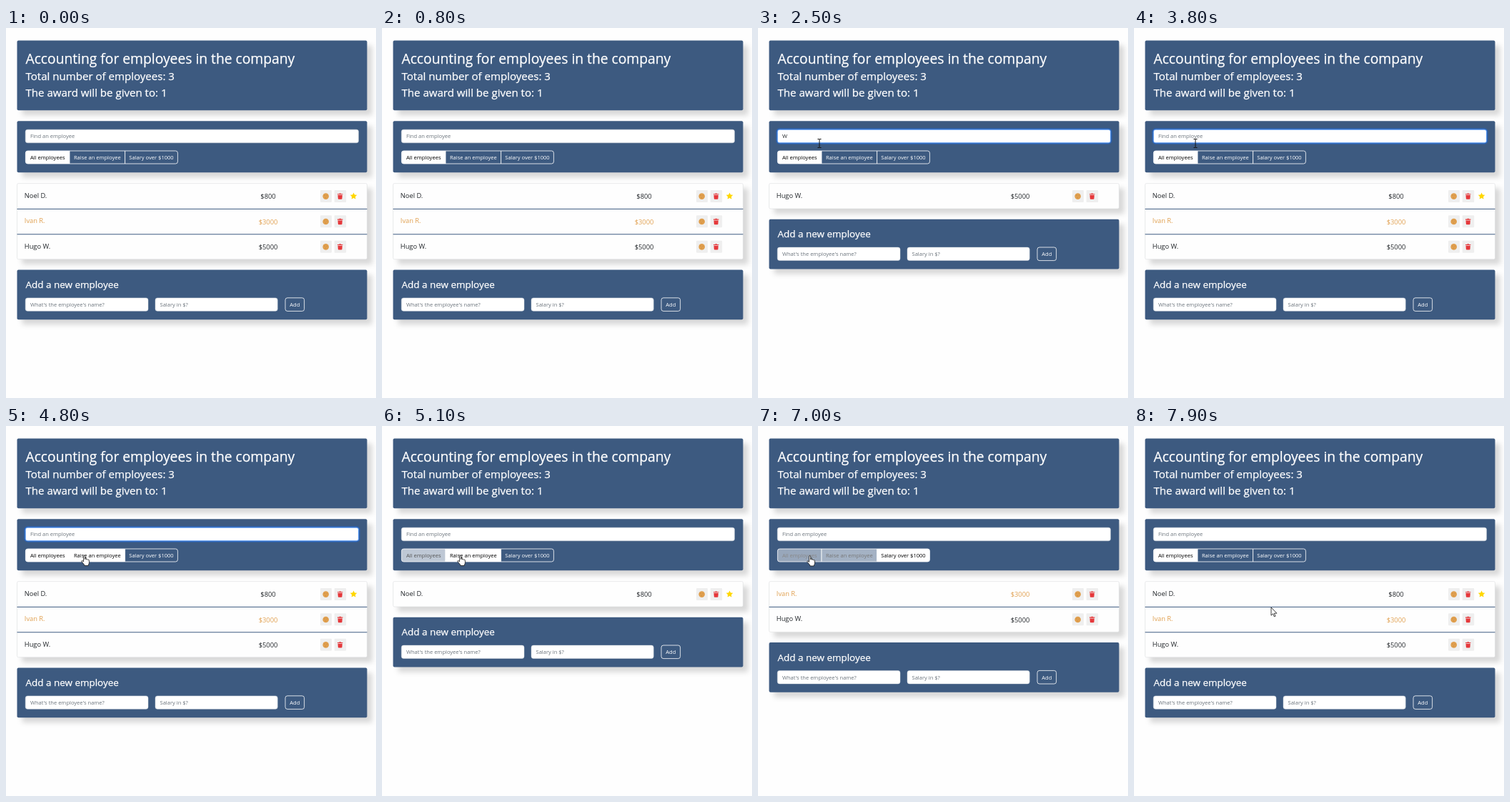
Write an HTML page that moves like this. It is 518 px wide and 518 px high and loops after 8000 ms.

```html
<!DOCTYPE html>
<html lang="en">
<head>
<meta charset="utf-8">
<title>Employee accounting</title>
<style>
  html, body { margin: 0; height: 100%; overflow: hidden; background: #fefefe; }
  svg { display: block; width: 100vw; height: 100vh; }
  text { font-family: "Open Sans", "Noto Sans", sans-serif; fill: #fff; white-space: pre; }
  .panel { fill: #3d5a80; }
  .panel, .list { filter: drop-shadow(7.5px 7.5px 3.8px rgba(0, 0, 0, .15)); }
  .list { fill: #fefefe; stroke: #dcdde0; stroke-width: .6; }
  .h { stroke: #fff; stroke-width: .25; }
  .h1 { font-size: 19.25px; }
  .h2 { font-size: 15.06px; }
  .h3 { font-size: 13.45px; }
  .small { font-size: 7.55px; }
  .mid { text-anchor: middle; }
  .field { fill: #fff; stroke: #ced4da; stroke-width: .5; }
  .hint { fill: #6c757d; }
  .row text { font-size: 9.3px; fill: #212529; }
  .row.bonus text { fill: #e09f4e; }
  .line { stroke: #3d5a80; stroke-width: 1; }
  .tool { fill: #efefef; }
  .focus .field { stroke: #5b9bf8; stroke-width: 1; }
  .ring { fill: none; stroke: rgba(13, 110, 253, .35); stroke-width: 2; visibility: hidden; }
  .focus .ring { visibility: visible; }
  .btn { stroke: #fff; stroke-width: .8; }
</style>
</head>
<body>
<svg viewBox="0 0 518 518">
  <defs>
    <g id="tools">
      <rect class="tool" x="440" y="9.3" width="16" height="17" rx="1"/>
      <rect class="tool" x="459.7" y="9.3" width="16.5" height="17" rx="1"/>
      <circle cx="447.7" cy="18" r="4.3" fill="#e09f4e"/>
      <g fill="#c58a45">
        <circle cx="446" cy="16.8" r=".6"/><circle cx="449.2" cy="17" r=".6"/><circle cx="447.4" cy="19.8" r=".6"/>
      </g>
      <path fill="#e5383b" d="M464 14.6h2.2l.6-.8h1.8l.6.8h2.2v1.1h-7.4zM464.5 16.4h6.4l-.4 5q-.1.8-.9.8h-3.8q-.8 0-.9-.8z"/>
    </g>
  </defs>

  <rect class="panel" x="15.5" y="17.5" width="490" height="97.7" rx="2"/>
  <text class="h h1" x="27.5" y="50">Accounting for employees in the company</text>
  <text class="h h2" x="27.5" y="73">Total number of employees: 3</text>
  <text class="h h2" x="27.5" y="95.7">The award will be given to: 1</text>

  <rect class="panel" x="15.5" y="130.3" width="490" height="72" rx="2"/>
  <g id="search">
    <rect class="ring" x="26.2" y="141.2" width="468.4" height="20.6" rx="4"/>
    <rect class="field" x="27.2" y="142.2" width="466.4" height="18.6" rx="3"/>
    <text class="small" id="query" x="34" y="154.4"></text>
  </g>
  <g id="tabs"></g>

  <rect class="list" id="list" x="15.5" y="217.6" width="490" rx="2"/>
  <g id="rows"></g>

  <g id="add">
    <rect class="panel" x="15.5" y="338.5" width="490" height="69.7" rx="2"/>
    <text class="h h3" x="27.5" y="364">Add a new employee</text>
    <rect class="field" x="27.2" y="377.9" width="171.8" height="18.4" rx="3"/>
    <text class="small hint" x="34" y="390">What's the employee's name?</text>
    <rect class="field" x="209" y="377.9" width="171.2" height="18.4" rx="3"/>
    <text class="small hint" x="215.5" y="390">Salary in $?</text>
    <rect class="btn" x="391" y="377.8" width="26.6" height="18.6" rx="3" fill="none"/>
    <text class="small mid" x="404.3" y="390">Add</text>
  </g>

  <g id="cursor">
    <path data-kind="beam" fill="none" stroke="#111" stroke-width="1" d="M-2.5-6h2l.5.5.5-.5h2M0-5.5v11M-2.5 6h2l.5-.5.5.5h2"/>
    <path data-kind="hand" fill="#fff" stroke="#111" stroke-width=".8" stroke-linejoin="round"
      d="M-1 1Q-1-.3 0-.3T1.1 1V5.2Q2-.1 3.1 5.4 4.2 4.2 5.1 5.8 6.6 5 6.9 6.7V10Q6.9 11.6 5.8 12.7V14H.2V12.8L-3.6 8.4Q-4 7-2.7 7L-1 8.4Z"/>
    <path data-kind="arrow" fill="#fff" stroke="#111" stroke-width=".8" stroke-linejoin="round"
      d="M0 0V11.2L2.6 8.8 4.3 12.9 6 12.2 4.3 8.2H7.9Z"/>
  </g>
</svg>
<script>
const LOOP = 8000, STEP = 100, ROW = 35.4, FADE = 15;
const FOCUS = 1500, TYPE = 2200, ERASE = 3800, BLUR = 5000;
const NAVY = [61, 90, 128], WHITE = [255, 255, 255], BLACK = [0, 0, 0];

const staff = [
  { name: "Noel D.", pay: 800, star: true },
  { name: "Ivan R.", pay: 3000, bonus: true },
  { name: "Hugo W.", pay: 5000 }
];
const tabs = [
  { label: "All employees", x: 27.4, end: 89, keep: () => true },
  { label: "Raise an employee", x: 89, end: 166.6, keep: p => p.star },
  { label: "Salary over $1000", x: 166.6, end: 240.4, keep: p => p.pay > 1000 }
];
const clicks = [[0, 0], [5060, 1], [6400, 2], [7400, 0]];   // time, tab
const path = [                                              // time, x, y
  [1000, 135, 232], [1400, 77, 160], [2100, 77, 160], [2400, 86, 161.5],
  [3900, 86, 161.5], [4500, 109.5, 181.5], [5400, 109.5, 181.5], [6100, 204.8, 181.5],
  [6500, 204.8, 181.5], [7100, 62, 182], [7400, 62, 182], [7900, 192, 254]
];

const $ = id => document.getElementById(id);
function make(parent, tag, attrs, text) {
  const el = document.createElementNS("http://www.w3.org/2000/svg", tag);
  for (const k in attrs) el.setAttribute(k, attrs[k]);
  if (text) el.textContent = text;
  return parent.appendChild(el);
}
const mix = (a, b, k) => `rgb(${a.map((v, i) => Math.round(v + (b[i] - v) * k))})`;

function tabShape({ x, end }, i) {
  const l = i === 0 ? 3 : 0, r = i === 2 ? 3 : 0, w = end - x - l - r;
  return `M${x + l} 172h${w}q${r} 0 ${r} ${r}v${18 - 2 * r}q0 ${r} ${-r} ${r}h${-w}` +
    `q${-l} 0 ${-l} ${-l}v${2 * l - 18}q0 ${-l} ${l} ${-l}z`;
}
tabs.forEach((tab, i) => {
  tab.box = make($("tabs"), "path", { class: "btn", d: tabShape(tab, i) });
  tab.text = make($("tabs"), "text", { class: "small mid", x: (tab.x + tab.end) / 2, y: 183.7 }, tab.label);
});

function starPoints(cx, cy, r) {
  return Array.from({ length: 10 }, (_, i) => {
    const a = i * Math.PI / 5, q = i % 2 ? r * .5 : r;
    return `${(cx + q * Math.sin(a)).toFixed(2)},${(cy - q * Math.cos(a)).toFixed(2)}`;
  }).join(" ");
}
for (const p of staff) {
  p.el = make($("rows"), "g", { class: p.bonus ? "row bonus" : "row" });
  make(p.el, "text", { x: 25.8, y: 20.2 }, p.name);
  make(p.el, "text", { x: 367, y: 21.6, class: "mid" }, "$" + p.pay);
  make(p.el, "use", { href: "#tools" });
  if (p.star) make(p.el, "polygon", { points: starPoints(486.6, 17.8, 5), fill: "#ffd700" });
  p.line = make(p.el, "line", { class: "line", x1: 15.5, x2: 505.5, y1: ROW + .4, y2: ROW + .4 });
}

function pointer(t) {
  const n = path.findIndex(k => k[0] > t);
  if (n === 0) return null;
  if (n < 0) return path[path.length - 1].slice(1);
  const [t0, x0, y0] = path[n - 1], [t1, x1, y1] = path[n];
  const u = (t - t0) / (t1 - t0), k = u * u * (3 - 2 * u);
  return [x0 + (x1 - x0) * k, y0 + (y1 - y0) * k];
}
const activeTab = t => clicks.filter(c => c[0] <= t).pop()[1];
function hoverTab(t) {
  const p = pointer(t);
  return p && p[1] >= 172 && p[1] <= 190 ? tabs.findIndex(b => p[0] >= b.x && p[0] < b.end) : -1;
}
// Colour fade: the share of the last 150 ms in which the tab was lit.
function glow(i, t) {
  let lit = 0;
  for (let k = 0; k < FADE; k++) {
    const s = Math.max(0, t - k * 10);
    if (activeTab(s) === i || hoverTab(s) === i) lit++;
  }
  return lit / FADE;
}

function draw(t) {
  const typed = t >= TYPE && t < ERASE ? "W" : "";
  $("search").setAttribute("class", t >= FOCUS && t < BLUR ? "focus" : "");
  $("query").textContent = typed || "Find an employee";
  $("query").style.fill = typed ? "#212529" : "#6c757d";

  tabs.forEach((tab, i) => {
    const k = glow(i, t);
    tab.box.style.fill = mix(NAVY, WHITE, k);
    tab.text.style.fill = mix(WHITE, BLACK, k);
  });

  const shown = staff.filter(p => p.name.includes(typed) && tabs[activeTab(t)].keep(p));
  for (const p of staff) {
    const i = shown.indexOf(p);
    p.el.style.display = i < 0 ? "none" : "";
    p.el.setAttribute("transform", `translate(0 ${217.6 + i * ROW})`);
    p.line.style.display = i === shown.length - 1 ? "none" : "";
  }
  $("list").setAttribute("height", shown.length * ROW);
  $("add").setAttribute("transform", `translate(0 ${(shown.length - 3) * ROW})`);

  const pos = pointer(t);
  $("cursor").style.display = pos ? "" : "none";
  if (!pos) return;
  const [x, y] = pos;
  const kind = hoverTab(t) >= 0 ? "hand" : y > 142 && y < 162 ? "beam" : "arrow";
  $("cursor").setAttribute("transform", `translate(${x} ${y})`);
  for (const el of $("cursor").children) el.style.display = el.dataset.kind === kind ? "" : "none";
}

const start = performance.now();
function tick() {
  const t = (performance.now() - start) % LOOP;
  draw(Math.floor(t / STEP) * STEP);
  requestAnimationFrame(tick);
}
tick();
</script>
</body>
</html>
```
